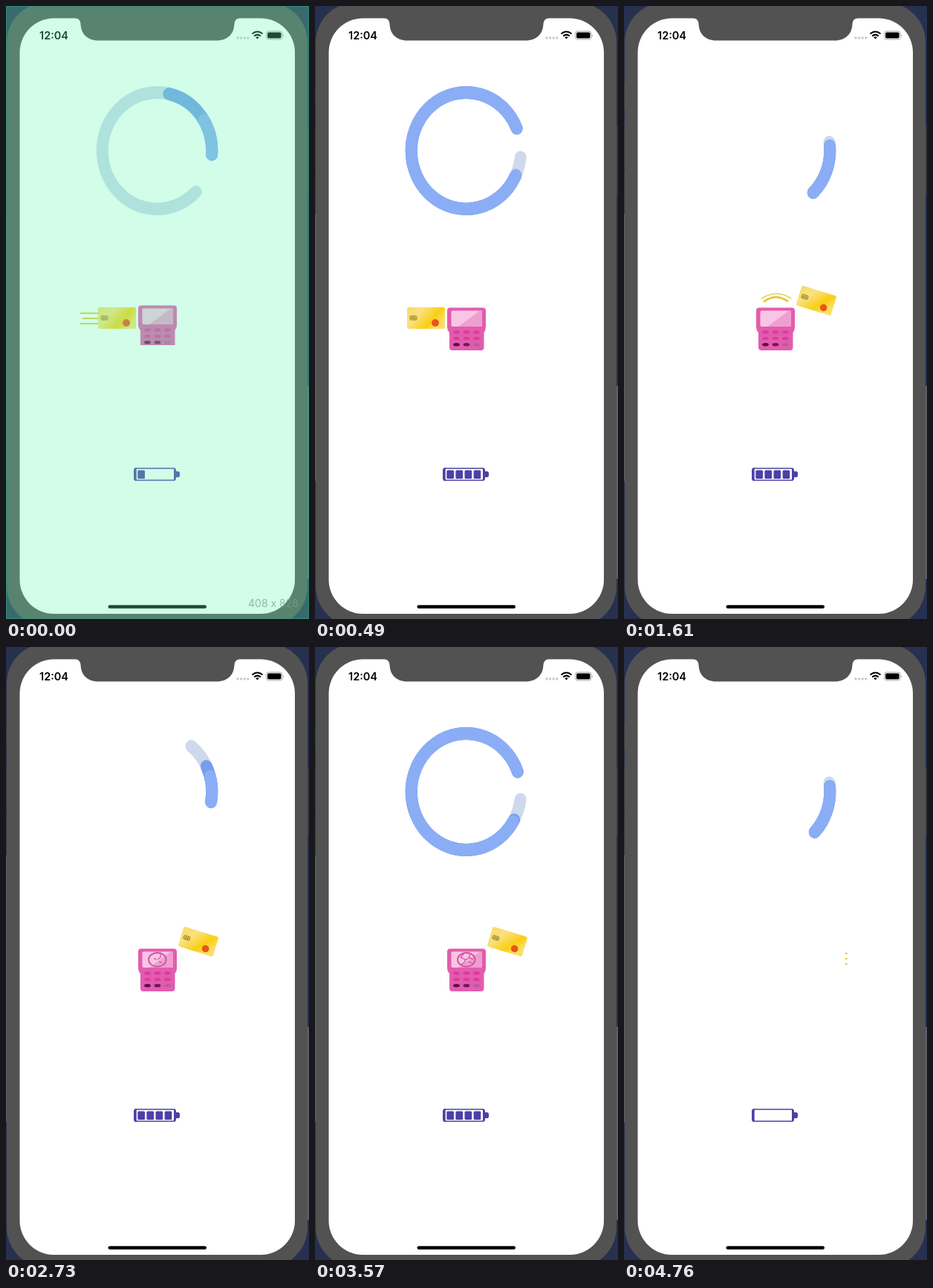
An HTML page for the animation above (4830 ms loop, 408 px wide and 826 px high).

```html
<!DOCTYPE html>
<html lang="en">
<head>
<meta charset="utf-8">
<title>Loaders</title>
<style>
  html, body { margin: 0; width: 100%; height: 100%; overflow: hidden; background: #27304f; }
  svg { display: block; width: 408px; height: 826px; }
  text { font-family: Inter, "Liberation Sans", sans-serif; }
</style>
</head>
<body>
<svg viewBox="0 0 408 826">
  <defs>
    <linearGradient id="gold" x2="1" y2=".5">
      <stop offset="0" stop-color="#f8da64"/>
      <stop offset=".35" stop-color="#fae182"/>
      <stop offset=".75" stop-color="#f9cf14"/>
      <stop offset="1" stop-color="#fbdf66"/>
    </linearGradient>
    <clipPath id="slot"><rect id="slotBox" x="170" y="395" width="70"/></clipPath>
  </defs>

  <!-- phone -->
  <rect width="408" height="826" fill="#27304f"/>
  <path d="M0 280h2v360h-2zM406 512h2v260h-2z" fill="#5c6068"/>
  <path d="M0 105h3v32h-3zM0 162h3v56h-3zM0 222h3v56h-3zM404 162h4v92h-4z" fill="#3c3c40"/>
  <rect x="1" y="-5" width="405" height="841" rx="54" fill="#525252"/>
  <rect x="18.5" y="16.5" width="370.5" height="802.5" rx="46" fill="#fff"/>
  <path d="M93 16Q100 17 100.5 24C101 38 110 46.5 124 46.5H284C298 46.5 307 38 307.5 24Q308 17 315 16Z" fill="#525252"/>
  <text x="45" y="44.5" font-size="14.5" font-weight="600">12:04</text>
  <path d="M312 43h15" stroke="#c9c9c9" stroke-width="3.4" stroke-linecap="round" stroke-dasharray="0 4.6"/>
  <path d="M331.5 37.5Q338.5 31.5 345.5 37.5M334.2 40.500Q338.5 36.7 342.8 40.5" fill="none" stroke="#000" stroke-width="2"/>
  <path d="M336.3 42.2Q338.5 40.5 340.7 42.2L338.5 44.500Z"/>
  <rect x="350.5" y="34" width="21.5" height="11" rx="3" fill="none" stroke="#a8a8a8"/>
  <rect x="352" y="35.5" width="18.5" height="8" rx="1.7"/>
  <path d="M373 37.500q1.500 2 0 4z" fill="#a8a8a8"/>
  <rect x="137.5" y="807.2" width="132.5" height="4.6" rx="2.3"/>

  <!-- ring -->
  <g id="ring" transform="translate(203.5 195) scale(.94 1)" fill="none" stroke-width="17" stroke-linecap="round">
    <path stroke="#cfd9ec"/><path stroke="#759fec"/><path stroke="#8aadf5"/>
  </g>

  <!-- payment -->
  <g id="waves" fill="none" stroke="#e6c63c" stroke-linecap="round">
    <path d="M185 394.5Q205 381 225 394" stroke-width="1.300"/>
    <path d="M189 398Q204 387 220 397.500" stroke-width="2.800"/>
  </g>
  <g id="slotView" clip-path="url(#slot)">
    <g id="terminal">
      <path d="M182 406.5H226Q230 406.5 230 410.5V433Q230 437 227.5 440V460Q227.5 464 223.5 464H185Q181 464 181 460V440Q178 437 178 433V410.5Q178 406.5 182 406.5Z" fill="#e25cae"/>
      <rect x="183.5" y="410.5" width="41.5" height="21.5" rx="2" fill="#f8c6e4"/>
      <path d="M222 410.5H225V430Q225 432 223 432H193Z" fill="#ee9fd0"/>
      <g id="keys"></g>
      <g id="stamp" fill="none" stroke="#d44d9f">
        <ellipse cx="203.8" cy="421.3" rx="11.8" ry="9.3" stroke-width="1.8" pathLength="100"/>
        <path d="M208 414.5V418.5L213 421M208 418.5L203 421.5L200 426L196 428M203 421.5L196 418L200 414M206 424L212 426" pathLength="100" stroke-width="1.3"/>
      </g>
    </g>
  </g>
  <g id="sparks" stroke="#e3c02c" stroke-linecap="round">
    <path d="M203.5 370.5H204.5" stroke-width="2"/><path d="M198 402L201.5 397.5" stroke-width="2.5"/>
  </g>
  <path id="speed" stroke="#e8c83a" stroke-width="2" stroke-linecap="round"/>
  <g id="card">
    <rect x="-25.5" y="-14.5" width="51" height="29" rx="2.5" fill="url(#gold)"/>
    <rect x="-21.5" y="-3" width="9" height="5.5" rx="1.2" fill="#e4c750" stroke="#91802c" stroke-width=".8"/>
    <path d="M-18.5 -3V2.5M-15.5 -3V2.5M-21.5 0H-12.5" stroke="#91802c" stroke-width=".7"/>
    <circle cx="12.5" cy="6.5" r="5" fill="#ea5418"/>
  </g>

  <!-- battery -->
  <g fill="#4d40a6">
    <rect x="173" y="623" width="55" height="16" rx="2.5" fill="none" stroke="#4d40a6" stroke-width="1.7"/>
    <path d="M172.2 626q0-4 3.5-4v18q-3.5 0-3.5-4zM226 622.5q3 0 3 4.5h2.5q2.5 0 2.5 2.5v3q0 2.5-2.5 2.5H229q0 4.5-3 4.500z"/>
    <g id="bars"></g>
  </g>

  <!-- capture overlay -->
  <g id="overlay">
    <rect width="408" height="826" fill="#63f8b4" fill-opacity=".295"/>
    <rect x=".5" y=".5" width="407" height="825" fill="none" stroke="#2f9c86" stroke-opacity=".6"/>
    <text x="326" y="810" font-size="14" fill="#7d9f91" fill-opacity=".75">408 x 826</text>
  </g>
</svg>
<script>
const LOOP = 4830, STEP = 70;
const SPIN = 3115, SPIN_FROM = 2730, RUN = 1995;
const $ = id => document.getElementById(id);
const set = (el, attrs) => { for (const k in attrs) el.setAttribute(k, attrs[k]); };
const range = (n, f) => Array.from({ length: n }, (_, i) => f(i));
const clamp = x => Math.min(1, Math.max(0, x));
const linear = (t, from, to) => clamp((t - from) / (to - from));
const ease = (t, from, to) => {
  const x = linear(t, from, to);
  return x * x * (3 - 2 * x);
};

function add(parent, tag, attrs) {
  const el = document.createElementNS('http://www.w3.org/2000/svg', tag);
  set(el, attrs);
  return parent.appendChild(el);
}

range(9, i => add($('keys'), 'ellipse', {
  cx: 190.5 + i % 3 * 13.5, cy: 439.5 + Math.floor(i / 3) * 8.4, rx: 4.3, ry: 2.2,
  fill: i < 6 ? '#df3a9c' : ['#5a0f4a', '#78145a', '#b5609c'][i - 6]
}));
const bars = range(4, i =>
  add($('bars'), 'rect', { x: 177.3 + i * 12.1, y: 625.5, width: 9.7, height: 11.5, rx: 1.5 }));

// Ring angles: degrees counter-clockwise from the right.
// The leading end accelerates through most of a turn, then settles.
function ringStart(u) {
  const p = linear(u, SPIN_FROM, SPIN_FROM + RUN);
  const q = linear(u, SPIN_FROM + RUN, SPIN_FROM + SPIN);
  return 350 + 324 * (.52 * p ** 2 + .48 * p ** 8) + 36 * q * (2 - q);
}

// The trailing ends make one sharp turn per spin, each at its own time.
const ringEnd = (mid, sharp) => u => {
  const x = (u - mid) / SPIN;
  const turn = Math.atan(sharp * Math.tan(Math.PI * x)) / Math.PI + Math.round(x);
  return 546 + 360 * turn;
};
const ringEnds = [ringEnd(2935, 11.4), ringEnd(3256, 9.7), ringEnd(3385, 16)];

function arc(from, to) {
  const point = a => {
    const r = -a * Math.PI / 180;
    return `${78.5 * Math.cos(r)} ${78.5 * Math.sin(r)}`;
  };
  return `M${point(from)}A78.5 78.5 0 ${to - from > 180 ? 1 : 0} 0 ${point(to)}`;
}

function drawRing(t) {
  const u = SPIN_FROM + (t - SPIN_FROM + SPIN) % SPIN;
  // The leading end is written one turn behind the trailing ones at rest.
  range(3, i => set($('ring').children[i], { d: arc(ringStart(u), Math.max(ringEnds[i](u), ringStart(u)) ) }));
}

function drawCard(t) {
  const over = ease(t, 630, 1400), back = ease(t, 3640, 3990), exit = ease(t, 4200, 4480);
  const x = 149.5 + 109.5 * over - 55.5 * back + 81.5 * exit;
  const y = 420.5 - 23.5 * over + 20.5 * back + 3 * exit;
  const turn = 17 * (ease(t, 900, 1400) - back);
  const size = 1 - .04 * over + .23 * back - .29 * exit;
  set($('card'), {
    transform: `translate(${x} ${y}) rotate(${turn}) scale(${size})`,
    opacity: 1 - linear(t, 4340, 4480)
  });

  // Speed lines shrink behind the card as it arrives, and again after it leaves.
  const arriving = t < 280;
  const tail = arriving ? 100.5 + 23.5 * ease(t, 0, 280) : 180 + 118.5 * linear(t, 4270, 4760);
  const tip = arriving ? 125 : 185 + 127 * ease(t, 4270, 4480) - 12 * linear(t, 4550, 4760);
  const lines = range(3, i => `M${tail + (arriving && i === 1 ? 3 : 0)} ${(arriving ? 414 : 413) + 7 * i}H${tip}`);
  set($('speed'), { d: arriving || t >= 4270 ? lines.join('') : '' });
  set($('sparks'), { opacity: t >= 4060 && t < 4200 ? 1 : 0 });
}

function drawTerminal(t) {
  const rise = ease(t, 0, 210);
  set($('terminal'), { transform: `translate(0 ${3 * rise - 3})` });
  set($('slotBox'), { height: 62 + 9 * rise });
  set($('slotView'), { opacity: 1 - ease(t, 3780, 3990) });
  set($('waves'), { opacity: ease(t, 1330, 1470) - ease(t, 1820, 2030) });
  [linear(t, 2240, 2660), linear(t, 2660, 3430)].forEach((done, i) => set($('stamp').children[i], {
    'stroke-dasharray': `${100 * done} 200`, opacity: done > 0 ? 1 : 0
  }));
}

function draw(t) {
  drawRing(t);
  drawCard(t);
  drawTerminal(t);
  bars.forEach((bar, i) => set(bar, { opacity: t >= 140 * i && t < 4690 - 280 * i ? 1 : 0 }));
  set($('overlay'), { opacity: t < STEP ? 1 : 0 });
}

let origin;
function tick(now) {
  origin ??= now;
  draw(Math.floor((now - origin) % LOOP / STEP) * STEP);
  requestAnimationFrame(tick);
}
draw(0);
requestAnimationFrame(tick);
</script>
</body>
</html>
```
